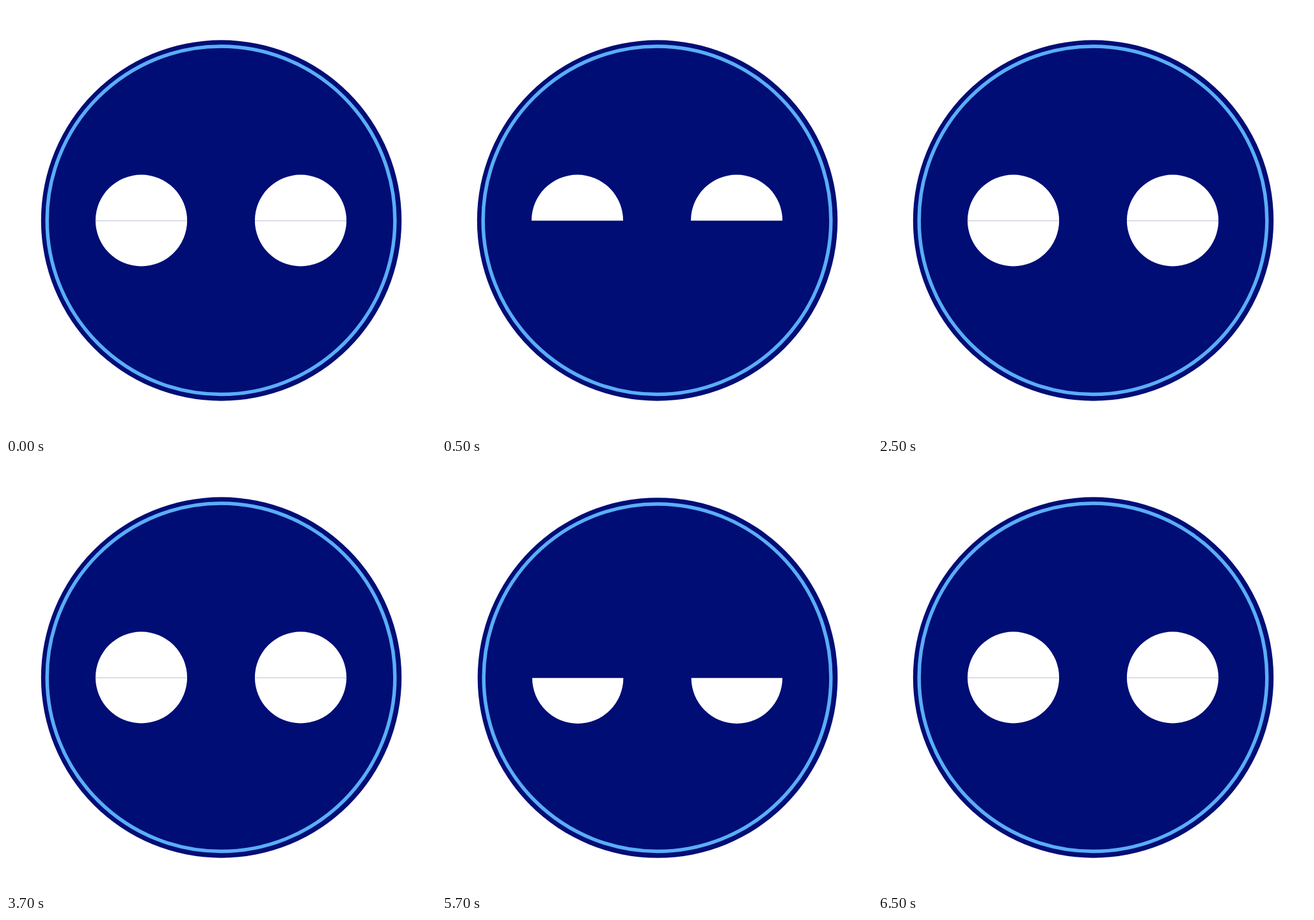
These frames come from a looping animation (672x670 px, 8 s). An HTML page:

```html
<!DOCTYPE html>
<html lang="en">
<head>
<meta charset="utf-8">
<title>Blinking face</title>
<style>
  html, body { margin: 0; height: 100%; overflow: hidden; background: #fff; }
  svg { display: block; width: 672px; height: 670px; }
</style>
</head>
<body>
<svg viewBox="0 0 672 670">
  <circle id="disc" fill="#000d75"/>
  <circle id="ring" fill="none" stroke="#5aaef7" stroke-width="5.5"/>
  <path id="eyes" fill="#fff"/>
</svg>
<script>
const LOOP = 8000;
const $ = id => document.getElementById(id);

function setCircle(id, cx, cy, r) {
  const el = $(id);
  el.setAttribute('cx', cx);
  el.setAttribute('cy', cy);
  el.setAttribute('r', r);
}

// Half disc above (sweep 1) or below (sweep 0) the horizontal line at y
const half = (x, y, r, sweep) => `M${x - r} ${y}A${r} ${r} 0 0 ${sweep} ${x + r} ${y}Z`;

function poseAt(t) {
  if (t >= 500 && t < 2500) return 'top';
  if (t >= 4500 && t < 6500) return 'bottom';
  return 'full';
}

function draw(pose) {
  if (pose === 'bottom') {
    setCircle('disc', 337, 335.5, 281.3);
    setCircle('ring', 336.5, 335.2, 271.3);
    $('eyes').setAttribute('d', half(212.2, 335.7, 71.2, 0) + half(460.8, 335.7, 71.2, 0));
    return;
  }
  setCircle('disc', 336.5, 335, 281.7);
  setCircle('ring', 336, 334.8, 271.8);
  let d = '';
  for (const x of [211.5, 460.5]) {
    d += half(x, 335.2, 71.6, 1);
    if (pose === 'full') d += half(x, 334.9, 71.6, 0);
  }
  $('eyes').setAttribute('d', d);
}

let shown;
function tick() {
  const pose = poseAt(performance.now() % LOOP);
  if (pose !== shown) draw(shown = pose);
  requestAnimationFrame(tick);
}
tick();
</script>
</body>
</html>
```
